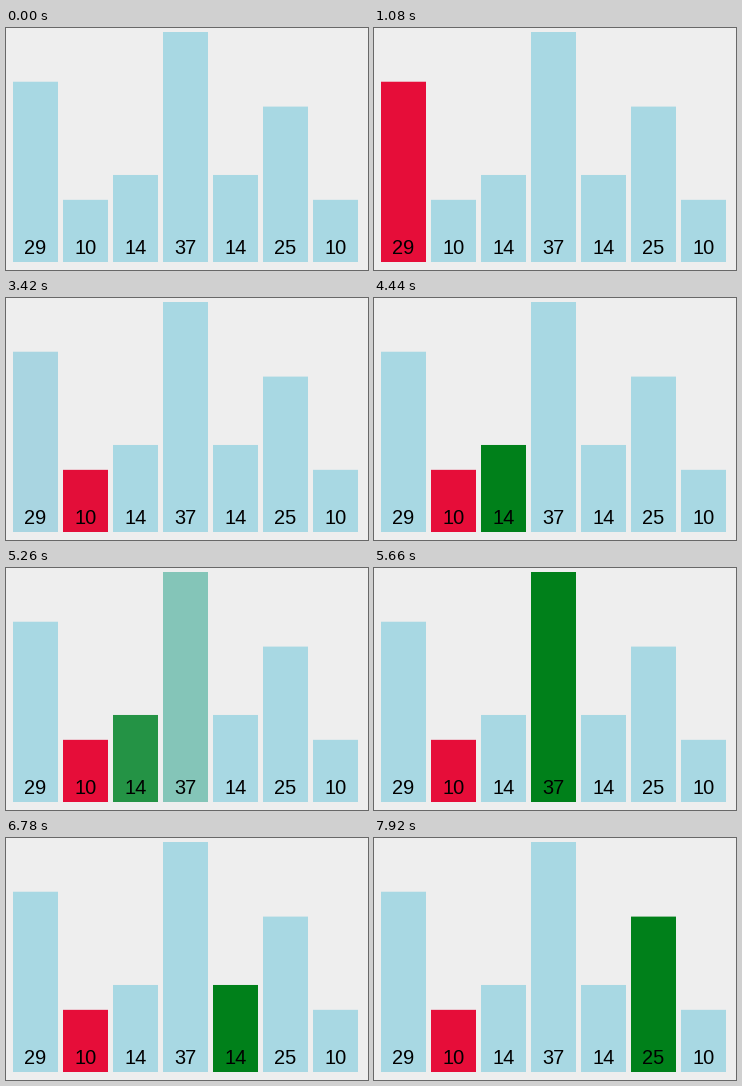
These frames come from a looping animation (362 px wide and 242 px high, 8 s). A matplotlib script:

```python
import math

import matplotlib.pyplot as plt
import numpy as np
from matplotlib.animation import FuncAnimation
from matplotlib.patches import Rectangle

W, H, DPI = 362, 242, 100
STEP_MS, LOOP_MS = 20, 8000

VALUES = [29, 10, 14, 37, 14, 25, 10]
LEFT, PITCH, BAR_W, BASE, MAX_H = 7, 50, 45, 234, 230

IDLE = np.array([168, 216, 227]) / 255
MINIMUM = np.array([230, 13, 57]) / 255
CURRENT = np.array([0, 128, 26]) / 255

# (start ms, length ms, steps, {bar: new colour})
FADES = [
    (500, 580, 14, {0: MINIMUM}),
    (1640, 560, 13, {1: CURRENT}),
    (2860, 580, 14, {0: IDLE, 1: MINIMUM}),
    (3880, 560, 13, {2: CURRENT}),
    (5100, 560, 13, {2: IDLE, 3: CURRENT}),
    (6220, 560, 13, {3: IDLE, 4: CURRENT}),
    (7360, 560, 13, {4: IDLE, 5: CURRENT}),
]


def swing(p):
    return 0.5 - math.cos(math.pi * p) / 2


def colours_at(t):
    colours = [IDLE] * len(VALUES)
    for start, length, steps, changes in FADES:
        if t < start:
            break
        done = (t - start) * (steps - 1) // length + 1
        p = swing(min(done / steps, 1))
        for i, new in changes.items():
            colours[i] = colours[i] * (1 - p) + new * p
    return colours


fig = plt.figure(figsize=(W / DPI, H / DPI), dpi=DPI, facecolor="#eeeeee")
ax = fig.add_axes([0, 0, 1, 1])
ax.set_xlim(0, W)
ax.set_ylim(H, 0)
ax.axis("off")

bars = []
for i, value in enumerate(VALUES):
    x = LEFT + i * PITCH
    height = MAX_H * value / max(VALUES)
    bar = Rectangle((x, BASE - height), BAR_W, height, lw=0, snap=False)
    bars.append(ax.add_patch(bar))
    ax.text(x + BAR_W / 2, 226, str(value), ha="center", va="baseline",
            family="Liberation Sans", size=20 * 72 / DPI, color="black")


def draw(frame):
    for bar, colour in zip(bars, colours_at(frame * STEP_MS)):
        bar.set_facecolor(colour)
    return bars


anim = FuncAnimation(fig, draw, frames=LOOP_MS // STEP_MS, interval=STEP_MS,
                     init_func=lambda: draw(0), repeat=True, repeat_delay=0,
                     cache_frame_data=False)
plt.show()
```
